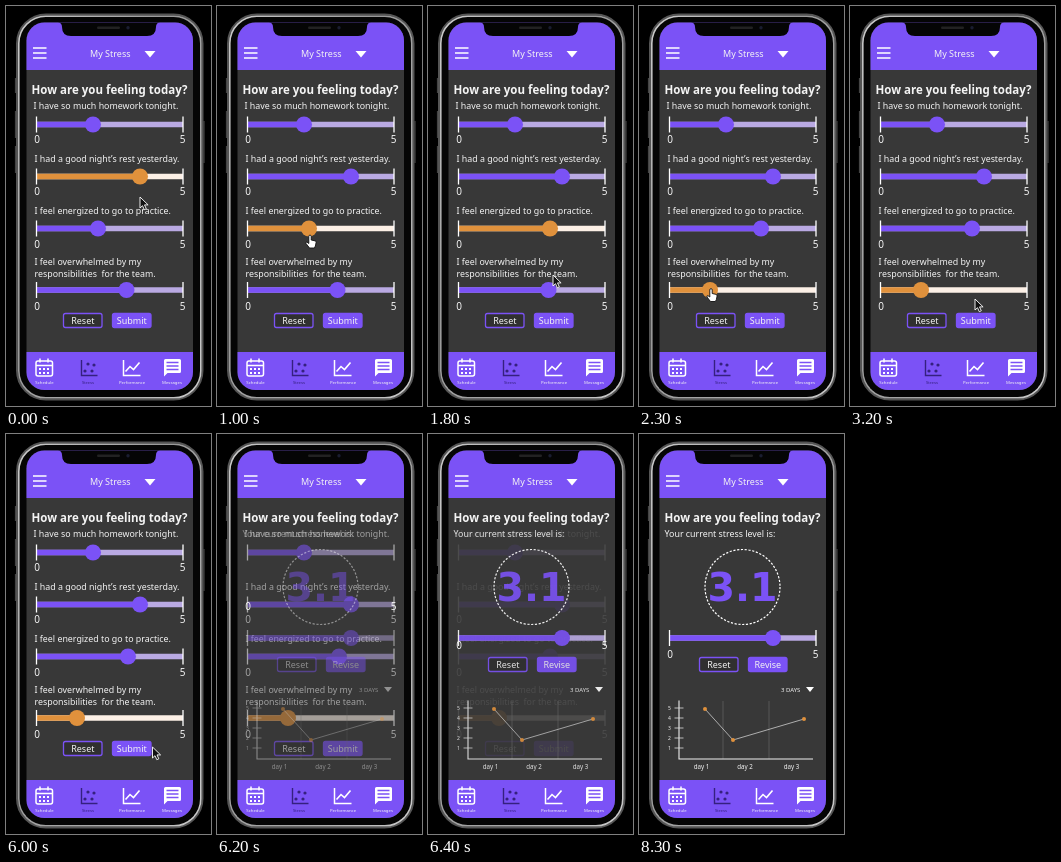
These frames come from a looping animation (205 by 400 pixels, 8400 ms). An HTML page:

```html
<!DOCTYPE html>
<html lang="en">
<head>
<meta charset="utf-8">
<title>Stress check-in</title>
<style>
html, body { margin: 0; width: 100%; height: 100%; overflow: hidden; background: #000; }
svg { display: block; width: 100%; height: 100%; }
text { font: 8.85px "Noto Sans", "Open Sans", sans-serif; fill: #f4f4f4; white-space: pre; }
.mid { text-anchor: middle; }
.title { font-size: 11.5px; font-weight: 700; }
.head { font-size: 9px; font-weight: 500; }
.btn { font-size: 9px; }
.num { font-size: 10px; }
.tiny { font-size: 6.2px; }
.tick { font-size: 5px; }
.nav { font-size: 4.3px; }
.score { font: 700 39.5px "DejaVu Sans", sans-serif; fill: #7b52f6; }
.line { fill: none; stroke: #fff; }
</style>
</head>
<body>
<svg viewBox="0 0 205 400">
  <defs>
    <linearGradient id="metal" x2="1" y2="1">
      <stop offset="0" stop-color="#ccc"/><stop offset=".4" stop-color="#999"/>
      <stop offset=".7" stop-color="#aaa"/><stop offset="1" stop-color="#ccc"/>
    </linearGradient>
    <clipPath id="screen"><rect x="20.5" y="16.5" width="166.5" height="367.5" rx="18"/></clipPath>
  </defs>
  <path d="M9.500 72v15M9.500 105v27M9.500 140v27M198 115v42" stroke="#444" stroke-width="1.2"/>
  <rect x="11" y="8.500" width="185.500" height="385" rx="29" fill="#050505" stroke="#555" stroke-width="2"/>
  <rect x="12.800" y="10.200" width="182" height="381.600" rx="27" fill="none" stroke="url(#metal)" stroke-width="1.6"/>
  <g clip-path="url(#screen)">
    <rect x="20" y="16" width="168" height="369" fill="#383838"/>
    <rect x="20" y="16" width="168" height="48" fill="#7b52f6"/>
    <path d="M52 16q4 1 4 5q0 9 9 9h76q9 0 9-9q0-4 4-5z" fill="#050505"/>
    <rect x="91" y="20.500" width="23" height="2.500" rx="1.200" fill="#222"/>
    <circle cx="122" cy="21.700" r="1.700" fill="#1a1d30"/>
    <path class="line" d="M27 42h13.500M27 47h13.500M27 52h13.500" stroke-width="1.600"/>
    <text class="head" x="84" y="51">My Stress</text>
    <path d="M138.500 45h11l-5.500 6.500z" fill="#fff"/>
    <text class="title" x="25.500" y="87.500">How are you feeling today?</text>
    <g id="form"></g>
    <g id="result"></g>
    <g id="ends"></g>
    <g id="nav"></g>
  </g>
  <g id="cursor" stroke-linejoin="round">
    <path id="arrow" d="M0 0v11l2.500-2.300 1.800 4 2-.9-1.800-3.900h3.600z" fill="#111" stroke="#fff" stroke-width=".9"/>
    <path id="hand" d="M-1.200 1q0-1.400 1.200-1.400t1.200 1.400v3.500l4 .9q1 .4.900 1.600l-.7 3.500-1 2h-4.900l-3.500-4.500q-.6-1.500.9-1.400l1.900 1.400z" fill="#fff" stroke="#111" stroke-width=".9"/>
  </g>
</svg>
<script>
const PURPLE = '#7b52f6', ORANGE = '#e0913c', DARK = '#35207f';
const $ = id => document.getElementById(id);

const text = (x, y, s, cls = '', more = '') =>
  `<text x="${x}" y="${y}" class="${cls}" ${more}>${s}</text>`;
const line = (d, w = 1, color = '#fff') =>
  `<path d="${d}" fill="none" stroke="${color}" stroke-width="${w}"/>`;

function slider(y, x, active) {
  const main = active ? ORANGE : PURPLE;
  return line(`M31 ${y}H177`, 5.4, active ? '#fcf0e6' : '#b9a9e2') +
    line(`M31 ${y}H${x}`, 5.4, main) +
    line(`M30.500 ${y - 8}v16M177 ${y - 8}v16`, 1.3) +
    `<circle cx="${x}" cy="${y}" r="8" fill="${main}"/>`;
}
const ends = y => text(31, y, '0', 'num mid') + text(176.5, y, '5', 'num mid');

const button = (x, y, label, fill) =>
  `<rect x="${x}" y="${y}" width="38.5" height="14" rx="2" fill="${fill}" stroke="${PURPLE}" stroke-width="1.3"/>` +
  text(x + 19.3, y + 10.8, label, 'btn mid');
const buttons = (x, y, label) => button(x, y, 'Reset', '#303030') + button(x + 49, y, label, PURPLE);

const questions =
  text(27.5, 103, 'I have so much homework tonight.') +
  text(28.5, 156, 'I had a good night’s rest yesterday.') +
  text(28.5, 208, 'I feel energized to go to practice.') +
  text(28.5, 259, 'I feel overwhelmed by my') +
  text(28.5, 271, 'responsibilities  for the team.') +
  [189, 242, 304].map(ends).join('') + buttons(57.5, 307.5, 'Submit');

function chart() {
  const points = [[66, 275], [94, 306], [165, 285]];
  let s = text(142, 258, '3 DAYS', '', 'style="font-size:6px"') +
    '<path d="M167 253h8l-4 5z" fill="#fff"/>' +
    line('M84 267V325M130 267V325', .7, '#666') + line('M40 266.500V325H174', 1.1, '#eee');
  for (let i = 0; i < 5; i++) {
    const y = 274 + 10 * i;
    s += line(`M35.500 ${y}h9`, .8, '#ddd') + text(30.5, y + 2, 5 - i, 'tick mid');
  }
  s += line('M' + points.join('L'), .8, '#ccc');
  for (const [x, y] of points) s += `<circle cx="${x}" cy="${y}" r="2" fill="${ORANGE}"/>`;
  return s + [62.5, 106, 152.5].map((x, i) => text(x, 335, 'day ' + (i + 1), 'tiny mid')).join('');
}

$('result').innerHTML =
  text(25.5, 103, 'Your current stress level is:') +
  '<circle cx="103.5" cy="153" r="37.500" class="line" stroke-width="1.2" stroke-dasharray="2.2 1.6"/>' +
  text(103.5, 167, '3.1', 'score mid') + slider(204, 134, false) +
  buttons(60.5, 223.5, 'Revise') + chart();

function nav() {
  let days = '';
  for (let i = 0; i < 6; i++) days += `M${33 + i % 3 * 4} ${363 + (i / 3 | 0) * 4}h2`;
  const dots = [[79, 365], [82, 358], [86, 365], [88, 359]]
    .map(([x, y]) => `<circle cx="${x}" cy="${y}" r="1.600" fill="${DARK}"/>`).join('');
  const names = ['Schedule', 'Stress', 'Performance', 'Messages'];
  return `<rect x="20" y="346" width="168" height="39" fill="${PURPLE}"/>` +
    '<rect x="30" y="355" width="16.500" height="15" rx="2" class="line" stroke-width="1.500"/>' +
    line('M30 359.500h16M34 352.500v4M42 352.500v4', 1.5) + line(days, 2) +
    line('M75.500 354v15.500h16', 1.4, DARK) + dots +
    line('M117.500 354v15.500h17', 1.5) + line('M119.500 365.500l4.500-5 3.500 3 6-7', 1.6) +
    '<path d="M159.500 353h14q1.500 0 1.500 1.500v11q0 1.500-1.500 1.500h-12l-3.500 3.500v-16q0-1.500 1.500-1.500z" fill="#fff"/>' +
    line('M160.500 356.500h12M160.500 360h12M160.500 363.500h12', 1.4, PURPLE) +
    names.map((n, i) => text([38.5, 82, 126, 166][i], 377.5, n, 'nav mid', i == 1 ? `style="fill:${DARK}"` : '')).join('');
}
$('nav').innerHTML = nav();

// time, x, y of the pointer
const path = [[0, 134, 191], [800, 93, 229.5], [1000, 93, 229.5], [1500, 122, 228], [1800, 125, 269],
  [1900, 121, 283], [2300, 72, 283], [2800, 72, 283], [3200, 125, 293], [3600, 146.5, 313]];

const ramp = (t, a, b) => Math.min(1, Math.max(0, (t - a) / (b - a)));
const mix = (a, b, p) => a + (b - a) * p;
const smooth = p => p * p * (3 - 2 * p);

function pointer(t) {
  let [, x, y] = path[0];
  for (let i = 1; i < path.length; i++) {
    const p = smooth(ramp(t, path[i - 1][0], path[i][0]));
    x = mix(x, path[i][1], p);
    y = mix(y, path[i][2], p);
  }
  return [x, y];
}

function draw(t) {
  const active = t < 900 ? 1 : t < 1900 ? 2 : 3;
  const xs = [87, 134, mix(92, 122, smooth(ramp(t, 1000, 1500))), mix(120.5, 71, smooth(ramp(t, 1900, 2300)))];
  const fade = 1 - (1 - ramp(t, 6100, 6660)) ** 3;
  $('form').innerHTML = questions +
    [118.5, 170.5, 222.5, 284].map((y, i) => slider(y, xs[i], i == active)).join('');
  $('form').setAttribute('opacity', 1 - fade);
  $('result').setAttribute('opacity', fade);
  $('ends').innerHTML = ends(mix(137, 224, fade));

  const hand = t >= 700 && t < 1600 || t >= 1900 && t < 2900;
  $('cursor').setAttribute('transform', `translate(${pointer(t)})`);
  $('cursor').style.display = t > 6100 ? 'none' : '';
  $('hand').style.display = hand ? '' : 'none';
  $('arrow').style.display = hand ? 'none' : '';
}

const start = performance.now();
function tick() {
  const t = (performance.now() - start) % 8400;
  draw(Math.floor(t / 100) * 100);
  requestAnimationFrame(tick);
}
tick();
</script>
</body>
</html>
```
